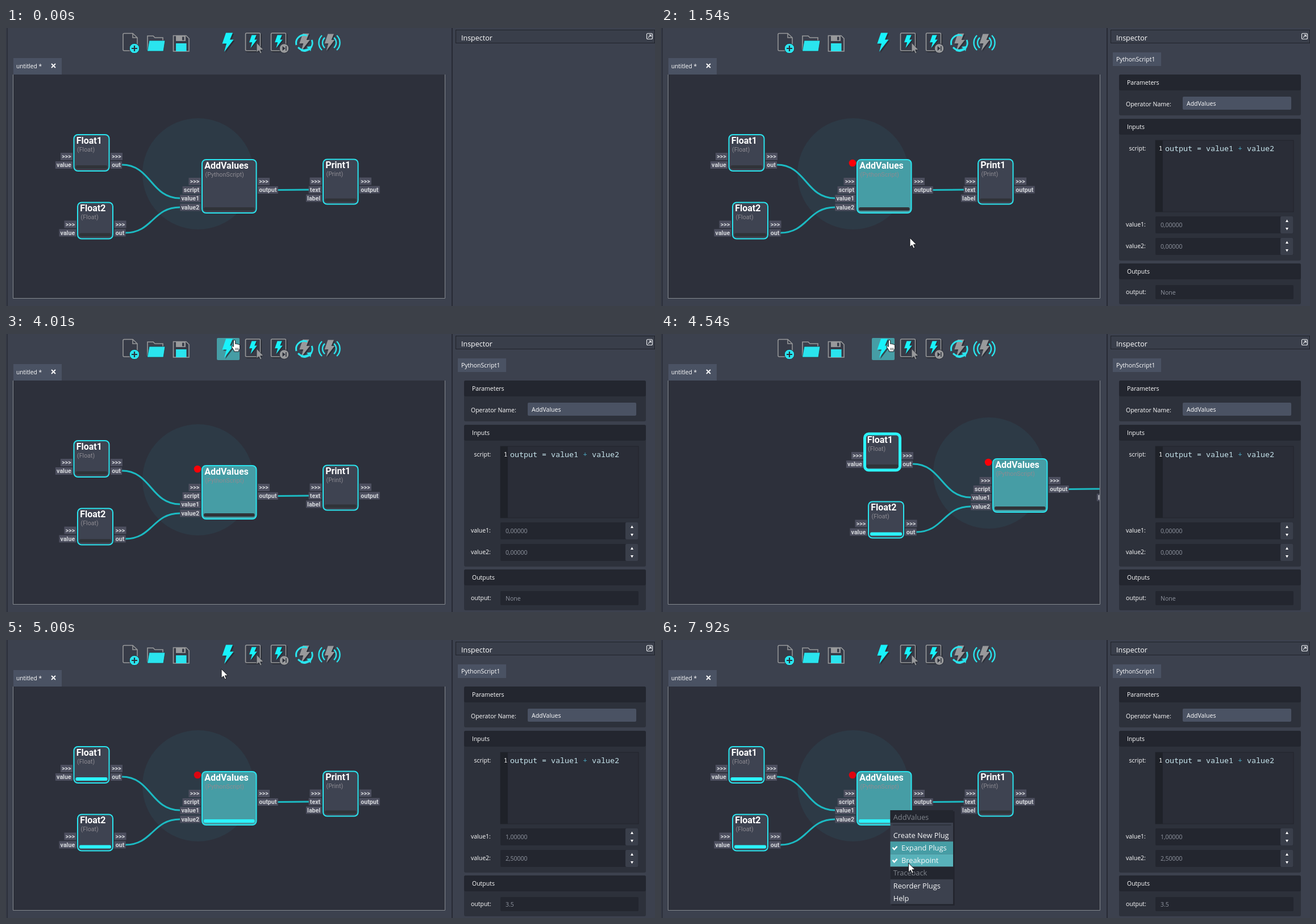
Write an HTML page that moves like this. It is 1142 px wide and 490 px high and loops after 8 s.

```html
<!DOCTYPE html>
<html lang="en">
<head>
<meta charset="utf-8">
<title>Node editor breakpoint</title>
<style>
html, body { margin: 0; width: 100%; height: 100%; overflow: hidden; background: #3c414e; }
svg { display: block; width: 1142px; height: 490px; }
text { white-space: pre; }
.ui { font: 10.5px "Open Sans", "Noto Sans", sans-serif; fill: #fff; }
.menu { font: 12.75px "Open Sans", "Noto Sans", sans-serif; fill: #f8f9fa; }
.name { font: bold 16px Roboto, sans-serif; fill: #fff; }
.type { font: 10.67px Roboto, sans-serif; fill: #8d8b92; }
.plug { font: bold 10.67px Roboto, sans-serif; fill: #d3d6da; }
.code { font: 13.33px "Noto Sans Mono", "DejaVu Sans Mono", monospace; fill: #c6e4ec; }
</style>
</head>
<body>
<svg id="stage" viewBox="0 0 1142 490"></svg>
<script>
const LOOP = 8000;
const CYAN = '#2ae4ee', TEAL = '#469da5', GLOW = '#58b2ba';
const BACK = '#3c414e', DARK = '#23262f', FIELD = '#4a5263', GRAY = '#98999b';
const stage = document.getElementById('stage');

function el(tag, attrs, parent = stage, text) {
  const node = document.createElementNS('http://www.w3.org/2000/svg', tag);
  set(node, attrs);
  if (text !== undefined) node.textContent = text;
  parent.appendChild(node);
  return node;
}
function set(node, attrs) {
  for (const key in attrs) node.setAttribute(key, attrs[key]);
}
const group = (parent = stage, attrs = {}) => el('g', attrs, parent);
const rect = (parent, x, y, width, height, fill, more = {}) =>
  el('rect', { x, y, width, height, fill, ...more }, parent);
const path = (parent, d, fill, more = {}) => el('path', { d, fill, ...more }, parent);
const label = (parent, cls, x, y, text, more = {}) =>
  el('text', { class: cls, x, y, ...more }, parent, text);
const line = (parent, d, stroke, width) =>
  path(parent, d, 'none', { stroke, 'stroke-width': width });
const show = (node, on) => node.setAttribute('visibility', on ? 'visible' : 'hidden');

// Window frame
rect(stage, 0, 0, 1142, 490, BACK);
rect(stage, 0, 0, 2, 490, '#343844');
rect(stage, 2, 0, 1, 490, '#272a34');
rect(stage, 784, 0, 2, 490, '#272a34');
rect(stage, 13, 53, 85, 29, FIELD);
label(stage, 'ui', 18, 71, 'untitled *', { style: 'font-size:10.2px' });
line(stage, 'M80 63 l7 7 m0 -7 l-7 7', '#fff', 1.8);

// Toolbar
const button = rect(stage, 371, 7, 40, 39, TEAL, { rx: 2 });
const BOLT = 'M-3 -17 H9 L4 -5 H10.5 L-6 16.5 L-2 2 H-9.5 Z';
function bolt(x, y, scale, fill) {
  const g = group(stage, { transform: `translate(${x} ${y}) scale(${scale})` });
  path(g, BOLT, '#23262e', { transform: 'translate(2 2)', opacity: .7 });
  path(g, BOLT, fill);
}
function card(x) {
  rect(stage, x + 1.5, 10.5, 26, 31, 'none', { rx: 2, stroke: '#23262e', 'stroke-width': 2 });
  rect(stage, x, 9, 26, 31, '#373b47', { rx: 2, stroke: GRAY, 'stroke-width': 1.6 });
  bolt(x + 13, 24, .68, '#18f2fb');
}
path(stage, 'M208 9.5 H223 L231 17 V40 H208 Q206 40 206 38 V11.5 Q206 9.5 208 9.5 Z', '#373b47',
  { stroke: GRAY, 'stroke-width': 1.5 });
line(stage, 'M223 9.5 V17 H231', GRAY, 1.5);
el('circle', { cx: 226, cy: 36, r: 8.8, fill: CYAN, stroke: '#2c303a' });
line(stage, 'M221 36 H231 M226 31 V41', '#2c303a', 2.2);

path(stage, 'M249 39 V14 H259 L262 17 H276 V23', BACK, { stroke: GRAY, 'stroke-width': 1.6 });
path(stage, 'M252 22 H280 L277 41 H248.5 Z', CYAN, { stroke: '#2c303a', 'stroke-width': .8 });

path(stage, 'M294.5 13.5 H317 L322 18.5 V41 H294.5 Z', '#373b47',
  { stroke: GRAY, 'stroke-width': 1.6 });
rect(stage, 299, 14, 17, 9, GRAY);
rect(stage, 310, 15.5, 3.5, 6, '#373b47');
rect(stage, 299, 27, 18.5, 14, CYAN);

bolt(390, 25.5, 1, '#18f2fb');
card(421.5);
path(stage, 'M441 26 V43 L445 39.5 L447.5 45 L450 44 L447.5 38.5 H453 Z', GRAY,
  { stroke: '#2c303a', 'stroke-width': .8 });
card(466.5);
el('circle', { cx: 489.5, cy: 36, r: 8.3, fill: GRAY, stroke: '#2c303a' });
path(stage, 'M486.5 32 L491.5 36 L486.5 40 Z M492 32 H493.5 V40 H492 Z', '#2c303a');
bolt(525, 25.5, .92, GRAY);
line(stage, 'M511 30 A14 14 0 0 1 530 13.5 M538 21 A14 14 0 0 1 519 39', CYAN, 3);
line(stage, 'M514 34 A14 14 0 0 0 532 37', CYAN, 3);
path(stage, 'M529 33 L538 32 L536 41 Z', CYAN);
bolt(569, 25.5, .88, GRAY);
line(stage, 'M561 17 A12 12 0 0 0 561 35 M577 17 A12 12 0 0 1 577 35', CYAN, 2.4);
line(stage, 'M556 13 A18 18 0 0 0 556 39 M582 13 A18 18 0 0 1 582 39', CYAN, 2.4);

// Graph view
el('rect', { x: 13, y: 82, width: 760, height: 395 },
  el('clipPath', { id: 'view' }, el('defs', {})));
rect(stage, 13, 82, 760, 395, '#2d303b');
const graph = group(group(stage, { 'clip-path': 'url(#view)' }));
line(stage, 'M12.5 82 V476.5 H772.5 V82', '#858990', 1);
el('circle', { cx: 338, cy: 257, r: 98, fill: '#2d3a46' }, graph);

for (const d of [
  'M204 241 C255 241 255 300 306 300',
  'M210 361 C258 361 258 316 306 316',
  'M478 285.5 L534 285'
]) line(graph, d, '#1cbac2', 3);

function plug(x, y, text, side) {
  const g = group(graph);
  const box = rect(g, 0, y - 6.5, 0, 13, '#4d4f5f');
  const t = label(g, 'plug', 0, y + 3.8, text);
  const w = t.getComputedTextLength() + 4.5;
  const left = side === 'in' ? x - w : x;
  set(box, { x: left, width: w });
  set(t, { x: left + 2.2 });
}
function makeNode(x, y, w, h, name, type, ins, outs) {
  const rows = [38.5, 53.5, 68.5, 84];
  ins.forEach((text, i) => plug(x - 2.5, y + rows[i], text, 'in'));
  outs.forEach((text, i) => plug(x + w + 2.5, y + rows[i], text, 'out'));
  const box = rect(graph, x, y, w, h, '#3e4351', { rx: 7, stroke: CYAN, 'stroke-width': 2 });
  const bar = rect(graph, x + 3, y + h - 10, w - 6, 6, '#303338', { rx: 2.5 });
  label(graph, 'name', x + 4.2, y + 15.5, name);
  label(graph, 'type', x + 5.5, y + 29.5, type);
  return function (busy, done, fill = '#3e4351') {
    set(box, { fill, 'stroke-width': busy ? 5 : 2, stroke: busy ? '#2cf3fa' : CYAN });
    set(bar, { fill: done ? '#2cf3fa' : '#303338' });
  };
}
const float1 = makeNode(119.5, 188, 62, 64, 'Float1', '(Float)', ['>>>', 'value'], ['>>>', 'out']);
const float2 = makeNode(126, 307.5, 62, 64, 'Float2', '(Float)', ['>>>', 'value'], ['>>>', 'out']);
const adder = makeNode(345, 232, 95.5, 94, 'AddValues', '(PythonScript)',
  ['>>>', 'script', 'value1', 'value2'], ['>>>', 'output']);
makeNode(558, 231.5, 61.5, 79, 'Print1', '(Print)', ['>>>', 'text', 'label'], ['>>>', 'output']);
const dot = el('circle', { cx: 337, cy: 238, r: 6.3 }, graph);

// Inspector
rect(stage, 791.5, 3.5, 350, 23, '#393e4a', { stroke: '#20232b' });
label(stage, 'ui', 801, 22, 'Inspector', { style: 'font-size:12.5px' });
rect(stage, 1127.5, 9.5, 10, 10, 'none', { rx: 2, stroke: '#e8eaed', 'stroke-width': 1.2 });
line(stage, 'M1130 17 L1135 12 M1131 12 H1135 V16', '#e8eaed', 1.2);

const panel = group();
const caption = (x, y, text) => label(panel, 'ui', x, y, text);
function section(y, h, title) {
  rect(panel, 806, y, 320, h, '#2d313b', { rx: 3 });
  rect(panel, 806, y, 320, 28, DARK, { rx: 3 });
  caption(820, y + 18, title);
}
rect(panel, 795, 43, 85, 24, FIELD);
caption(801, 59, 'PythonScript1');
section(82, 72, 'Parameters');
caption(818, 137.5, 'Operator Name:');
rect(panel, 918, 121, 191, 23, FIELD, { rx: 2 });
caption(925, 136.5, 'AddValues');

section(160, 250, 'Inputs');
caption(823.5, 216, 'script:');
rect(panel, 870, 198, 243, 126, '#2a2d37', { stroke: '#22252d' });
rect(panel, 870, 198, 13, 126, '#1f2229');
label(panel, 'code', 876, 216, '1', { style: 'font-size:10.5px;fill:#fff' });
const code = label(panel, 'code', 887, 217, '');
[['output = value1 ', '#c6e4ec'], ['+', '#4aa3bd'], [' value2', '#c6e4ec']]
  .forEach(([text, fill]) => el('tspan', { style: `fill:${fill}` }, code, text));

function field(y, h, name, textY) {
  caption(818, textY - 1, name);
  rect(panel, 870, y, 243, h, DARK, { rx: 2 });
  return label(panel, 'ui', 879, textY, '', { style: 'fill:#9095a0' });
}
function spinner(y, name) {
  const value = field(y, 30, name, y + 19);
  rect(panel, 1090, y, 22.5, 30, '#3a3f4b', { rx: 2 });
  path(panel, `M1099 ${y + 10} h5 l-2.5 -4.5 Z M1099 ${y + 20} h5 l-2.5 4.5 Z`, '#fff');
  return value;
}
const value1 = spinner(332, 'value1:');
const value2 = spinner(370, 'value2:');
section(415, 72, 'Outputs');
const output = field(453, 25, 'output:', 470);

// Context menu, built at its own origin
const menu = group();
rect(menu, 2, 2, 111, 166, '#1b1d24', { opacity: .6 });
rect(menu, 0, 0, 110.5, 165.5, BACK);
rect(menu, 0, 0, 110.5, 22, DARK);
rect(menu, 4, 25.5, 103, 1, DARK);
const DIM = { style: 'fill:#80858d' };
label(menu, 'menu', 5.3, 16.8, 'AddValues', DIM);
const items = ['Create New Plug', 'Expand Plugs', 'Breakpoint', 'Traceback', 'Reorder Plugs', 'Help']
  .map((text, i) => {
    const y = 33 + i * 22.2, inset = i === 1 || i === 2;
    const title = i === 3;
    const back = rect(menu, 0, y, 110.5, 22.2, title ? DARK : 'none');
    label(menu, 'menu', inset ? 19.6 : 5.3, y + 15.7, text, title ? DIM : {});
    const tick = line(menu, `M4 ${y + 10.5} l3 3.5 l5 -5.5`, '#fff', 2.4);
    return { y, title, back, tick };
  });

// Pointers
const OUTLINE = { stroke: '#15171c', 'stroke-width': 1, 'stroke-linejoin': 'round' };
const arrow = path(stage, 'M0 0 V16 L3.7 12.6 L6.2 18.2 L8.7 17.1 L6.3 11.7 H11.5 Z', '#fff', OUTLINE);
const hand = group();
path(hand, 'M-1.7 1 Q0 -1 1.7 1 V7 Q3.4 5.8 4.6 7.4 Q6.2 6.4 7.2 8.1 Q9.4 7.4 9.6 9.6 ' +
  'V14 Q9.4 17 7.8 18 V20.5 H-.8 V18.5 L-5 12.5 Q-5.4 10 -3.2 10.6 L-1.7 12 Z', '#fff', OUTLINE);
line(hand, 'M2 14 V18 M4.2 14 V18 M6.4 14 V18', '#15171c', .8);

// time, x, y
const TRACK = [
  [70, 436, 490], [400, 402, 290], [470, 401, 286], [740, 401, 288], [800, 414, 298],
  [1070, 438, 370], [1950, 438, 370], [2210, 348, 268], [2340, 313, 236], [2480, 337, 240],
  [2880, 337, 240], [3200, 372, 120], [3370, 410, 30], [3480, 405, 6], [3880, 405, 6],
  [3940, 404, 2], [4010, 402, 10.5], [4740, 402, 10.5], [5000, 379, 50], [5130, 380, 189],
  [5390, 393, 291], [5530, 393, 291], [5660, 406, 300], [6520, 406, 300], [6590, 404, 302],
  [7390, 404, 303], [7920, 435.5, 393]
];
function pointerAt(t) {
  const i = TRACK.findIndex(k => k[0] > t);
  if (i === 0) return TRACK[0].slice(1);
  if (i < 0) return TRACK[TRACK.length - 1].slice(1);
  const [t0, x0, y0] = TRACK[i - 1], [t1, x1, y1] = TRACK[i];
  const p = (t - t0) / (t1 - t0);
  return [x0 + (x1 - x0) * p, y0 + (y1 - y0) * p];
}
const within = (t, from, to) => t >= from && t < to;

function draw(t) {
  const [x, y] = pointerAt(t);
  const firstMenu = within(t, 540, 1470), lastMenu = t >= 7120;
  const menuOpen = firstMenu || lastMenu;
  const stopSet = t >= 1470, computed = t >= 4670;

  const onButton = within(t, 3300, 4900) && x >= 371 && x <= 411 && y <= 46;
  show(button, onButton);
  set(button, { fill: within(t, 3880, 4010) ? '#3b858d' : TEAL });
  show(arrow, t >= 70 && !onButton);
  show(hand, onButton);
  set(onButton ? hand : arrow, { transform: `translate(${x} ${y})` });

  set(graph, { transform: within(t, 4350, 4670) ? 'translate(239 -12)' : '' });
  float2(within(t, 4350, 4480), t >= 4480);
  float1(within(t, 4480, 4600), t >= 4600);
  const hovered = !menuOpen && x > 345 && x < 441 && y > 232 && y < 327;
  adder(within(t, 4600, 4670), computed,
    t < 400 ? '#3e4351' : hovered ? '#4ca5ad' : TEAL);
  show(dot, stopSet);
  set(dot, { fill: computed ? '#dc0510' : '#fb0007' });

  show(panel, t >= 400);
  value1.textContent = computed ? '1,00000' : '0,00000';
  value2.textContent = computed ? '2,50000' : '0,00000';
  output.textContent = computed ? '3.5' : 'None';

  const top = lastMenu ? 300 : 284;
  show(menu, menuOpen);
  set(menu, { transform: `translate(${lastMenu ? 403.5 : 400} ${top})` });
  items.forEach((item, i) => {
    const checked = i === 1 || (i === 2 && stopSet);
    const over = y - top >= item.y && y - top < item.y + 22.2;
    if (!item.title) {
      set(item.back, { fill: checked ? (over ? GLOW : TEAL) : over ? TEAL : 'none' });
    }
    show(item.tick, menuOpen && checked);
  });
}

const start = performance.now();
function tick() {
  draw((performance.now() - start) % LOOP);
  requestAnimationFrame(tick);
}
draw(0);
requestAnimationFrame(tick);
</script>
</body>
</html>
```
